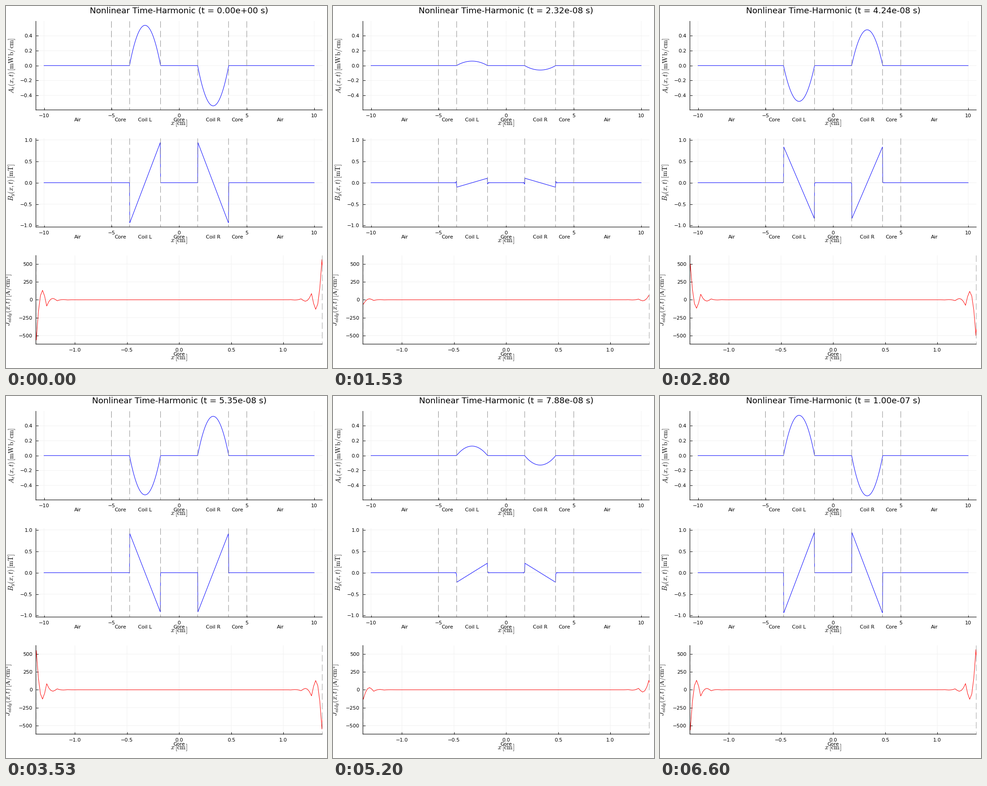
Animation of 705x794 px, one loop 6.67 s. Source, as a matplotlib script:

```python
import numpy as np
import matplotlib.pyplot as plt
from matplotlib.animation import FuncAnimation

W, H = 705, 794
FRAMES, INTERVAL = 230, 29
STEPS, RATE = 100, 15          # time samples and samples per second
PERIOD = 1e-7
LEFT, RIGHT, HALF = 65.7, 694.7, 97.2

plt.rcParams.update({"font.family": "DejaVu Sans", "mathtext.fontset": "cm"})
fig = plt.figure(figsize=(W / 72, H / 72), dpi=72, facecolor="white")

# Page axes in pixels, y downwards
page = fig.add_axes([0, 0, 1, 1], zorder=5)
page.set(xlim=(0, W), ylim=(H, 0))
page.axis("off")


def put(x, y, s, size=11.1, ha="center", rotation=0):
    return page.text(x, y, s, size=size, ha=ha, va="baseline",
                     rotation=rotation, rotation_mode="anchor")


EDGES = [-5.01, -3.659, -1.375, 1.375, 3.659, 5.01]
REGIONS = [(-7.5, "Air"), (-4.33, "Core"), (-2.517, "Coil L"), (0, "Core"),
           (2.517, "Coil R"), (4.33, "Core"), (7.5, "Air")]


def panel(mid, xmax, ymax, xticks, yticks, fmt, label, label_x, regions):
    """One plot centred on pixel row mid, with symmetric limits."""
    ax = fig.add_axes([LEFT / W, 1 - (mid + HALF) / H,
                       (RIGHT - LEFT) / W, 2 * HALF / H])
    ax.set(xlim=(-xmax, xmax), ylim=(-ymax, ymax), xticks=xticks, yticks=yticks)
    ax.set_axisbelow(True)
    ax.grid(color="#f1f1f1", lw=1, snap=False)
    ax.tick_params(direction="in", length=5, width=1,
                   labelbottom=False, labelleft=False)
    ax.spines[["top", "right"]].set_visible(False)
    ax.spines[["left", "bottom"]].set(linewidth=1.1, zorder=6, snap=False)
    ax.vlines(EDGES, ymax, -ymax, color="#8c8c8c", lw=1, zorder=4,
              linestyles=[(0, (14, 7))], snap=False)

    cx, bottom = (LEFT + RIGHT) / 2, mid + HALF
    px = (RIGHT - cx) / xmax
    for v in xticks:
        put(cx + v * px, bottom + 16.5, f"{v:{fmt[0]}}".replace("-", "−"))
    for v in yticks:
        put(58, mid - v * HALF / ymax + 4, f"{v:{fmt[1]}}".replace("-", "−"),
            ha="right")
    for v, name in regions:
        put(cx + v * px, bottom + 25.3, name)
    put(cx, bottom + 33.5, r"$x\,\mathrm{[cm]}$", 14.6)
    put(label_x, mid, label, 14.6, rotation=90)
    return ax


wide = [-10, -5, 0, 5, 10]
ax_a = panel(130.7, 10.6, 0.5958, wide, [-0.4, -0.2, 0, 0.2, 0.4], ("d", ".1f"),
             r"$A_z(x,t)\,\mathrm{[mW\,b/cm]}$", 17, REGIONS)
ax_b = panel(387.6, 10.6, 1.036, wide, [-1, -0.5, 0, 0.5, 1], ("d", ".1f"),
             r"$B_y(x,t)\,\mathrm{[mT]}$", 17, REGIONS)
ax_j = panel(644.4, 1.375, 620, [-1, -0.5, 0, 0.5, 1],
             [-500, -250, 0, 250, 500], (".1f", "d"),
             r"$J_{eddy}(x,t)\,\mathrm{[A/cm^2]}$", 10.5, [(0, "Core")])

# Field shapes on the mesh
x = np.linspace(-10, 10, 1000)
u = (np.abs(x) - 2.5225) / 1.1512
coil = np.abs(u) < 0.995
a_shape = np.where(coil, -np.sign(x) * 0.5416 * (1 - u**2), 0)
b_shape = np.where(coil, -0.956 * u, 0)

# Eddy currents ring and decay from each coil face into the core
n = np.arange(30)
ring = np.array([1, 0.301, -0.106, -0.236, -0.089])[n % 5] * 0.155 ** (n // 5)
eddy, skin = np.zeros_like(x), np.zeros_like(x)
for start, step, sign in ((316, -1, -1), (431, 1, -1), (568, -1, 1), (683, 1, 1)):
    nodes = start + step * n
    eddy[nodes] = sign * ring
    skin[nodes] = sign * step * np.gradient(ring)

line_a, = ax_a.plot(x, a_shape, color="blue", lw=1)
line_b, = ax_b.plot(x, b_shape, color="blue", lw=1)
line_j, = ax_j.plot(x, eddy, color="red", lw=1)
title = put((LEFT + RIGHT) / 2, 16, "", 18.3)


def update(i):
    # Hold the nearest time sample
    k = min(round(i * INTERVAL * RATE / 1000), STEPS - 1)
    turn = k / (STEPS - 1)
    c, s = np.cos(2 * np.pi * turn), np.sin(2 * np.pi * turn)
    line_a.set_ydata(c * a_shape)
    line_b.set_ydata(c * b_shape - 0.045 * s * skin)
    line_j.set_ydata(563.6 * c * eddy)
    title.set_text(f"Nonlinear Time-Harmonic (t = {turn * PERIOD:.2e} s)")
    return line_a, line_b, line_j, title


anim = FuncAnimation(fig, update, frames=FRAMES, interval=INTERVAL,
                     repeat=True, repeat_delay=0)
plt.show()
```
